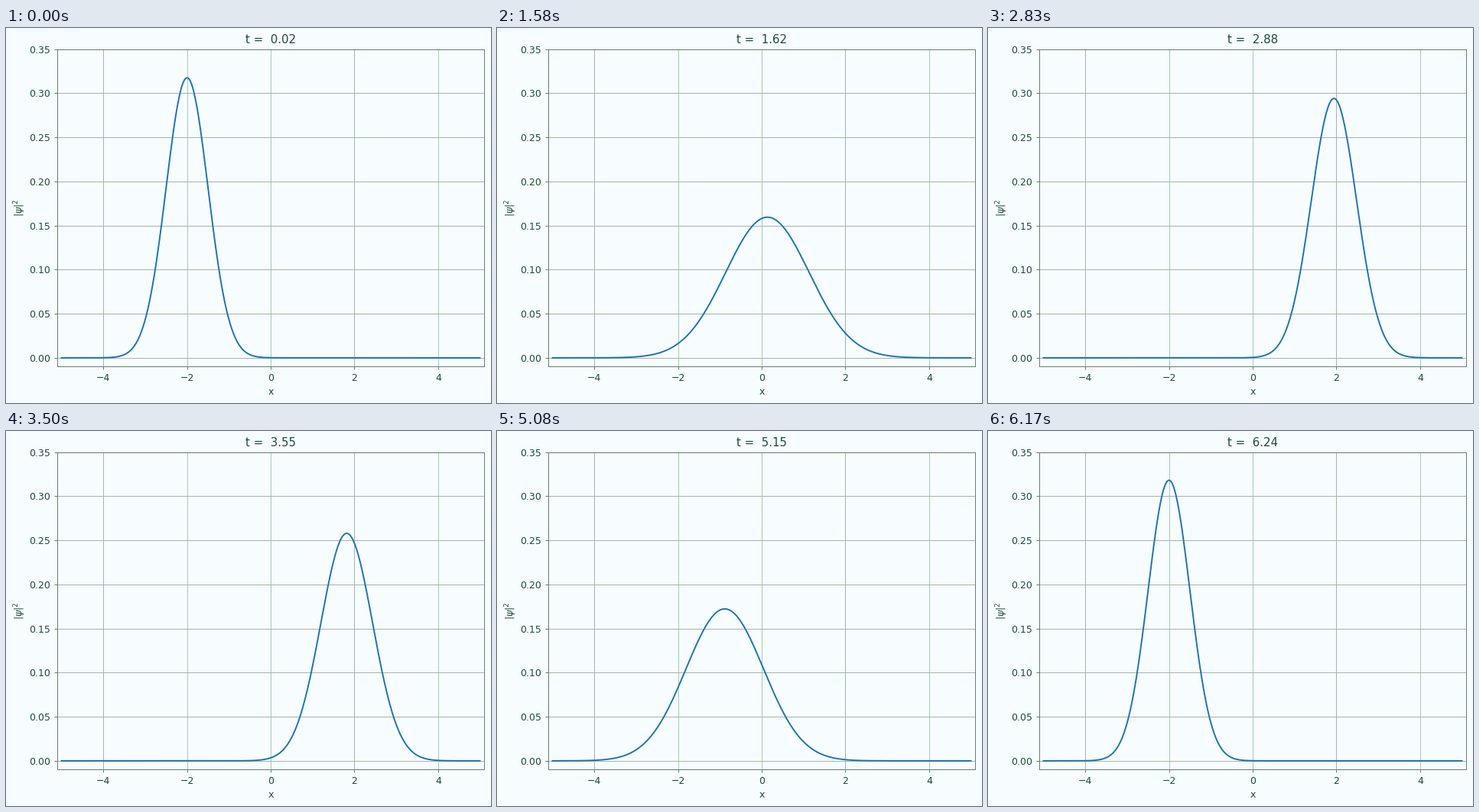
Recreate the animation shown at these times as a matplotlib script. Size 634 by 491 pixels, loop 6.26 s.

```python
import numpy as np
import matplotlib.pyplot as plt
from matplotlib.animation import FuncAnimation

W, H, DPI = 634, 491, 90
TICK_MS, TICKS = 20, 313
POSES, FPS = 75, 12
DT = 2 * np.pi / 299
STEPS = 4  # solver steps per pose

PAPER, INK, SPINE = "#f6fcff", "#1d4a34", "#66806a"
GREY, GREEN, BLUE = "#a7b5a9", "#a6ccb0", "#1a70b2"

plt.rcParams.update({
    "font.family": "DejaVu Sans",
    "font.size": 10,
    "text.color": INK,
    "axes.labelcolor": INK,
    "axes.edgecolor": SPINE,
    "xtick.color": SPINE,
    "ytick.color": SPINE,
    "xtick.labelcolor": INK,
    "ytick.labelcolor": INK,
})


def density(x, t):
    """Squeezed Gaussian packet swinging in a harmonic well."""
    var = 0.25 * np.cos(t) ** 2 + np.sin(t) ** 2
    centre = -2 * np.cos(t)
    return np.exp(-(x - centre) ** 2 / (2 * var)) / (2 * np.pi * np.sqrt(var))


# the tiny margin keeps the canvas from rounding down a pixel
fig = plt.figure(figsize=((W + 1e-4) / DPI, (H + 1e-4) / DPI),
                 dpi=DPI, facecolor=PAPER)
ax = fig.add_axes([67 / W, 47.6 / H, 558 / W, 415.8 / H], facecolor=PAPER)
ax.set(xlim=(-5.1, 5.1), ylim=(-0.01, 0.35), xlabel="x")
ax.set_ylabel(r"$|\psi|^2$", labelpad=2)
ax.set_xticks(range(-4, 5, 2))
ax.set_yticks(np.arange(8) * 0.05)
ax.grid(color=GREY, linewidth=0.8)
for i in (1, 2, 4):
    ax.get_xgridlines()[i].set_color(GREEN)

x = np.linspace(-5, 5, 500)
curve, = ax.plot(x, density(x, 0), color=BLUE, linewidth=1.5)
title = ax.set_title("", fontsize=12)


def update(tick):
    # twelve poses a second, each held over several ticks
    ms = TICK_MS * (tick + 0.75)
    pose = min(int(ms * FPS / 1000), POSES - 1)
    step = STEPS * pose + 1
    title.set_text(f"t = {step * DT:5.2f}")
    # the curve runs one step ahead of the clock
    curve.set_ydata(density(x, (step + 1) * DT))
    return curve, title


anim = FuncAnimation(fig, update, frames=TICKS, interval=TICK_MS,
                     repeat=True, repeat_delay=0, blit=False)
plt.show()
```
